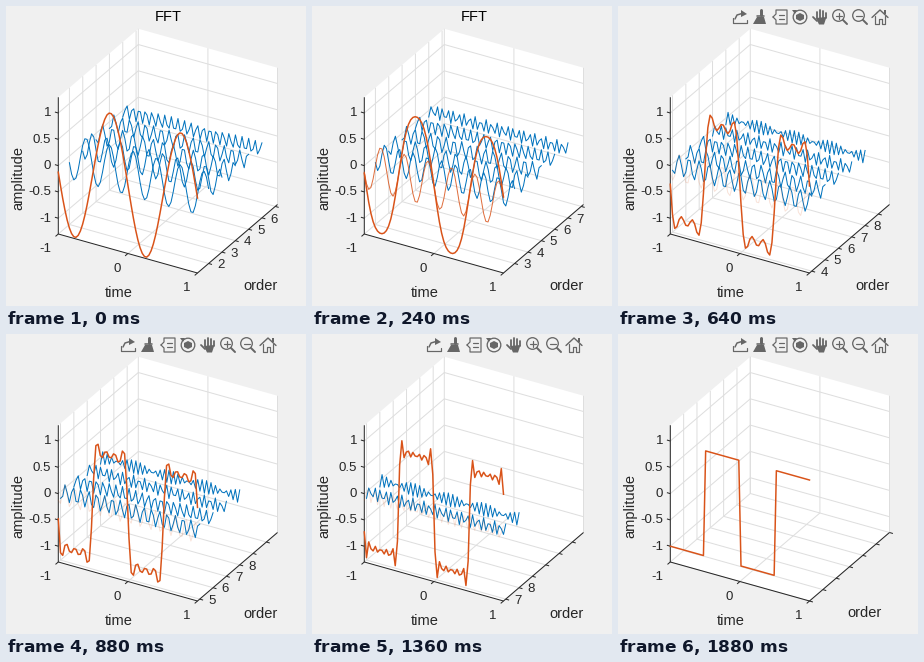
These frames come from a looping animation (300 px wide and 300 px high, 1920 ms). A matplotlib script:

```python
import numpy as np
import matplotlib.pyplot as plt
from matplotlib.animation import FuncAnimation
from matplotlib.collections import LineCollection
from matplotlib.patches import Circle, Polygon, Rectangle

plt.rcParams["font.family"] = "Liberation Sans"

FRAMES, STEPS, ORDERS, SPAN = 48, 6, 8, 6
TOOLBAR_FROM = 10
BLUE, ORANGE = "#0072bd", "#d95319"
INK, GRID, ICON = "#262626", "#dedede", "#666666"
PX = 0.72  # points per pixel at 100 dpi

fig = plt.figure(figsize=(3, 3), dpi=100, facecolor="#f0f0f0")
ax = fig.add_axes([0, 0, 1, 1])
ax.set_xlim(0, 300)
ax.set_ylim(300, 0)
ax.axis("off")


def project(t, depth, z):
    """Screen position; depth runs from 0 (front) to 1 (back)."""
    x = 52.3 + 69.6 * (t + 1) + 80 * depth
    y = 228 + 19.5 * (t + 1) - 68.5 * depth - 52.6 * (z + 1.3)
    return x, y


def path(*points):
    return [project(*p) for p in points]


def label(x, y, s, size=13.3, **kw):
    return ax.text(x, y, s, fontsize=size * PX, color=INK, va="baseline", **kw)


# Discrete Fourier components of a 32-sample square wave, two periods
n = np.arange(64)
time = np.linspace(-1, 1, 64)


def component(order):
    m = 2 * order - 1
    return -0.125 / np.sin(np.pi * m / 32) * np.sin(2 * np.pi * m * (n + 0.5) / 32)


waves = [component(k) for k in range(1, ORDERS + 1)]

# Walls and fixed grid
outline = path((-1, 0, -1.3), (-1, 0, 1.3), (-1, 1, 1.3),
               (1, 1, 1.3), (1, 1, -1.3), (1, 0, -1.3))
ax.add_patch(Polygon(outline, fc="white", ec="none", zorder=0))

grid, ticks = [], []
for t in (-1, 0, 1):
    grid.append(path((t, 0, -1.3), (t, 1, -1.3), (t, 1, 1.3)))
    x, y = project(t, 0, -1.3)
    ticks.append([(x, y), (x - 2.8, y + 2.4)])
    label(x - 7, y + 18, f"{t}", ha="right")
for z in (-1, -0.5, 0, 0.5, 1):
    grid.append(path((-1, 0, z), (-1, 1, z), (1, 1, z)))
    x, y = project(-1, 0, z)
    ticks.append([(x, y), (x - 3.4, y - 1)])
    label(x - 7, y + 3.3, f"{z:g}", ha="right")
axes_lines = path((-1, 0, 1.3), (-1, 0, -1.3), (1, 0, -1.3), (1, 1, -1.3))

ax.add_collection(LineCollection(grid, colors=GRID, linewidths=PX, zorder=1))
order_grid = ax.add_collection(LineCollection([], colors=GRID, linewidths=PX, zorder=1))
ax.add_collection(LineCollection([axes_lines] + ticks, colors=INK, linewidths=PX, zorder=2))
order_ticks = ax.add_collection(LineCollection([], colors=INK, linewidths=PX, zorder=2))

label(113, 291, "time", 14.6, ha="center")
order_name = label(254, 284, "order", 14.6, ha="center")
ax.text(12, 172, "amplitude", fontsize=14.6 * PX, color=INK,
        rotation=90, ha="center", va="center")
title = label(162, 15, "FFT", 14.6, ha="center")
title.set_color("black")

blues = [ax.plot([], [], color=BLUE, lw=PX, zorder=10 - i)[0] for i in range(5)]
numbers = [label(0, 0, "", ha="left") for _ in range(5)]
ghost, = ax.plot([], [], color=ORANGE, lw=PX, zorder=11)
total, = ax.plot([], [], color=ORANGE, lw=1.5 * PX, zorder=12)

# Toolbar
toolbar = []


def stroke(pts, w=1.2):
    toolbar.append(ax.plot(*zip(*pts), color=ICON, lw=w * PX, solid_capstyle="round")[0])


def shape(patch):
    toolbar.append(ax.add_patch(patch))


def fill(*pts):
    shape(Polygon(pts, fc=ICON, ec="none"))


def ring(x, y, r):
    shape(Circle((x, y), r, fc="none", ec=ICON, lw=1.3 * PX))


def export_icon(x):
    stroke([(x - 7, 12), (x - 7, 17), (x + 7, 17), (x + 7, 14)])
    stroke([(x - 5, 13), (x - 3, 9), (x + 2, 7.5)], 1.5)
    fill((x + 1, 4), (x + 7, 8), (x + 1, 11))


def brush_icon(x):
    stroke([(x + 1, 4), (x + 1, 9)], 3)
    stroke([(x - 3, 10), (x + 4, 10)], 1.6)
    fill((x - 3, 11), (x + 4, 11), (x + 6, 18), (x - 7, 18))


def datatip_icon(x):
    stroke([(x - 7, 11), (x - 4, 8), (x - 4, 4), (x + 7, 4), (x + 7, 18),
            (x - 4, 18), (x - 4, 14), (x - 7, 11)])
    for y in (9, 13):
        stroke([(x - 1, y), (x + 4, y)])


def rotate_icon(x):
    ring(x, 11, 6.8)
    fill((x, 7), (x + 4, 9), (x + 4, 13), (x, 15), (x - 4, 13), (x - 4, 9))
    fill((x - 8, 4), (x - 3, 4), (x - 5, 8))


def hand_icon(x):
    for dx, top in ((-3, 6), (0, 4), (3, 5), (6, 7)):
        stroke([(x + dx, top), (x + dx, 12)], 1.8)
    stroke([(x - 7, 11), (x - 3, 15)], 1.8)
    fill((x - 4, 12), (x + 6.5, 11), (x + 4, 18.5), (x - 1, 18.5))


def zoom_icon(x, plus):
    ring(x - 1.5, 9.5, 5.8)
    stroke([(x + 3, 14), (x + 7, 18)], 2)
    stroke([(x - 4.5, 9.5), (x + 1.5, 9.5)])
    if plus:
        stroke([(x - 1.5, 6.5), (x - 1.5, 12.5)])


def home_icon(x):
    stroke([(x - 8, 11.5), (x, 4), (x + 8, 11.5)], 1.4)
    stroke([(x - 5, 10), (x - 5, 18), (x - 1.5, 18), (x - 1.5, 13), (x + 1.5, 13),
            (x + 1.5, 18), (x + 5, 18), (x + 5, 10)])
    shape(Rectangle((x + 4, 4), 1.5, 4, fc=ICON, ec="none"))


export_icon(122)
brush_icon(142)
datatip_icon(162)
rotate_icon(182)
hand_icon(202)
zoom_icon(222, True)
zoom_icon(242, False)
home_icon(262)


def update(frame):
    k, s = frame // STEPS + 1, frame % STEPS + 1
    mix = s / STEPS

    def depth(order):
        return (order - k - mix) / SPAN

    # Order axis slides towards the viewer
    shown = [d for d in map(depth, range(k + 1, k + SPAN + 2)) if d < 1.0001]
    order_grid.set_segments(
        [path((-1, d, 1.3), (-1, d, -1.3), (1, d, -1.3)) for d in shown])
    marks = [project(1, d, -1.3) for d in shown]
    order_ticks.set_segments([[(x, y), (x + 3.4, y + 1)] for x, y in marks])

    for i, (line, num) in enumerate(zip(blues, numbers)):
        order = k + 1 + i
        visible = order <= ORDERS
        line.set_visible(visible)
        num.set_visible(visible)
        if visible:
            d = depth(order)
            line.set_data(*project(time, d, waves[order - 1]))
            x, y = project(1, d, -1.3)
            num.set_position((x + 8.5, y + 4.8))
            num.set_text(str(order))

    # Front component fades while it is added to the sum
    if k == 1:
        wave = waves[0]
    else:
        wave = sum(waves[:k - 1]) + mix * waves[k - 1]
    total.set_data(*project(time, 0, wave))
    ghost.set_data(*project(time, 0, waves[k - 1]))
    ghost.set_alpha(1 - mix)
    ghost.set_visible(k > 1)

    order_name.set_position((254, 284) if k < ORDERS else (246, 283))
    hover = frame >= TOOLBAR_FROM
    title.set_visible(not hover)
    for part in toolbar:
        part.set_visible(hover)
    return []


anim = FuncAnimation(fig, update, frames=FRAMES, interval=40,
                     repeat=True, repeat_delay=0, blit=False)
plt.show()
```
